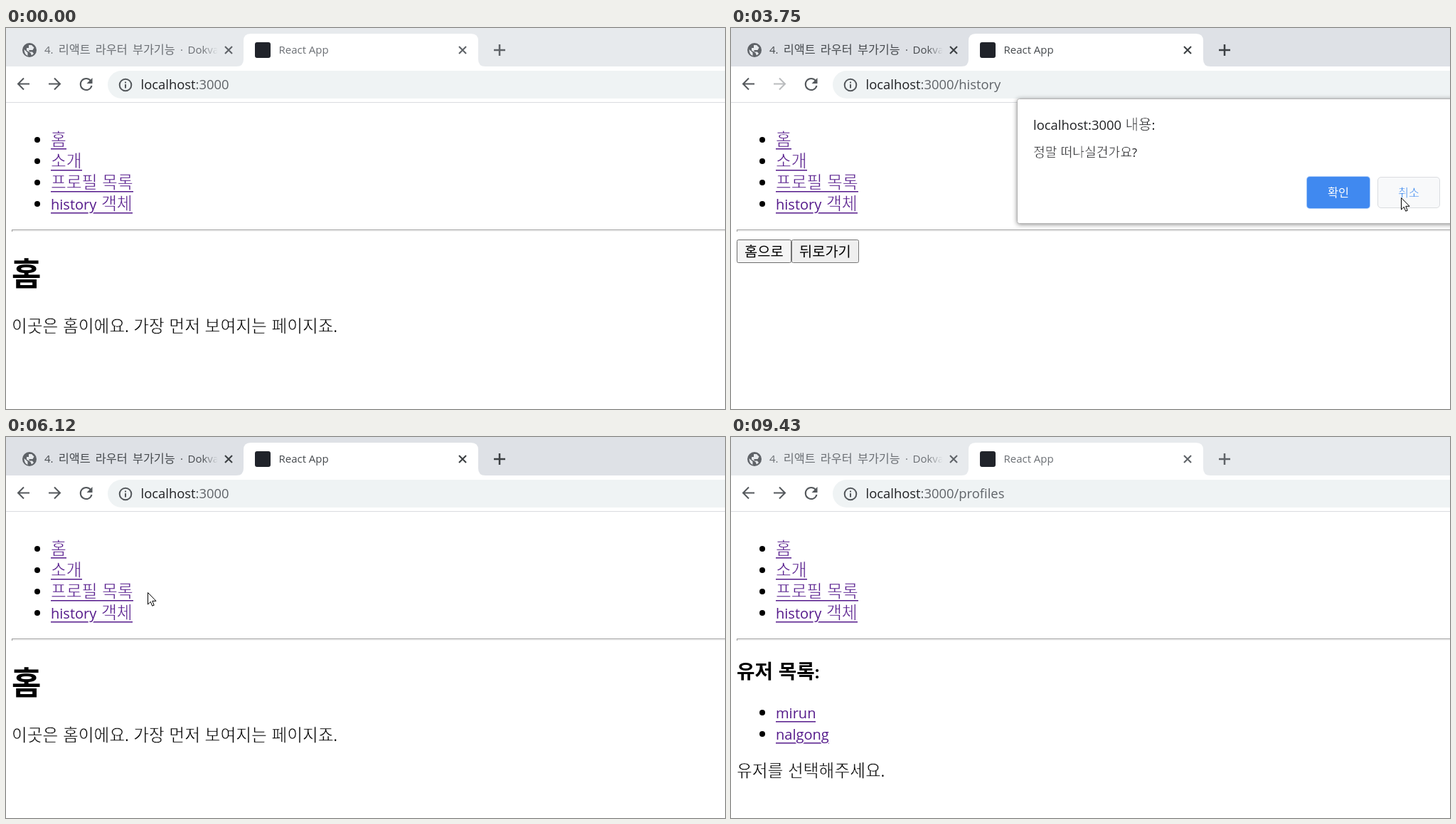
Write an HTML page that moves like this. It is 1011 by 535 pixels and loops after 9500 ms.

```html
<!DOCTYPE html>
<html lang="ko">
<head>
<meta charset="utf-8">
<title>React App</title>
<style>
html, body { margin: 0; width: 100%; height: 100%; overflow: hidden; background: #fff; }
svg { display: block; width: 100%; height: 100%; }
text { font-family: 'Noto Sans CJK KR', 'Noto Sans CJK JP', sans-serif; font-weight: 300; }
.latin { font-family: 'Open Sans', 'Noto Sans', sans-serif; font-weight: 400; }
.bold, .bold .latin { font-weight: 700; }
/* a hairline in the background colour slims the strokes */
.thin { stroke: #fff; stroke-width: .55; }
.thin .latin { stroke: none; }
.link { fill: #551a8b; }
.link .latin { stroke: #fff; stroke-width: 3.5; paint-order: stroke; }
.icon { fill: none; stroke: #54585c; stroke-width: 2; }
#strip { fill: #dee1e6; }
.tabText { fill: #45494d; }
.tabIcon { fill: none; stroke: #3c4043; stroke-width: 2.1; }
.idle #strip { fill: #e7eaed; }
.idle .tabText { fill: #6b6f74; }
.idle .tabIcon { stroke: #5f6368; }
#panel { fill: #fff; stroke: #b4b4b4; filter: drop-shadow(0 1px 3px rgba(0,0,0,.45)); }
</style>
</head>
<body>
<svg id="stage" viewBox="0 0 1011 535">
  <defs>
    <linearGradient id="fade" gradientUnits="userSpaceOnUse" x1="276" x2="298" y1="0" y2="0">
      <stop offset="0" stop-color="#fff"/><stop offset="1" stop-color="#fff" stop-opacity="0"/>
    </linearGradient>
    <mask id="cut" maskUnits="userSpaceOnUse" x="0" y="0" width="340" height="60">
      <rect width="297" height="60" fill="url(#fade)"/>
    </mask>
  </defs>
  <rect width="1011" height="535" fill="#fff"/>

  <rect id="strip" width="1011" height="54"/>
  <path d="M324 54q10 0 10-10V18q0-10 10-10H654q10 0 10 10V44q0 10 10 10z" fill="#fff"/>
  <circle cx="33" cy="31" r="10" fill="#5f6368"/>
  <path d="M25.5 30l5 4.5v4.5q-5-2-5-9zM32 24l4 0 3.5 3.5-2 3.5h-5l0 2.5h4.5l2 2.5-3 2.5-1.5-3.5-5.5-3.5v-3.5h3z" fill="#e7eaed"/>
  <rect x="350" y="20" width="22" height="22" rx="3" fill="#20232a"/>
  <g id="tabs"></g>
  <path class="tabIcon" d="M308 26l10 10m0-10l-10 10M637 26l10 10m0-10l-10 10"/>
  <path class="tabIcon" style="stroke-width:2.5" d="M686 31h16m-8-8v16"/>

  <rect y="104" width="1011" height="1" fill="#dadce0"/>
  <rect x="143" y="60" width="920" height="39" rx="19.5" fill="#eff3f4"/>
  <path class="icon" d="M33 78.5H17m8-8l-8 8 8 8"/>
  <path class="icon" id="forward" d="M60 78.5h16m-8-8l8 8-8 8"/>
  <path class="icon" d="M119 74a8 8 0 1 0 1.5 7"/>
  <path d="M121.5 70v8h-8z" fill="#54585c"/>
  <circle class="icon" cx="168" cy="80" r="8.3"/>
  <path class="icon" d="M168 79v5.5m0-9v2"/>
  <text class="latin" x="189.5" y="86" font-size="18.4" fill="#202124">localhost<tspan id="path" fill="#5f6368"></tspan></text>

  <g id="nav"></g>
  <path d="M8 283H1011v1H9v2H8z" fill="#9a9a9a"/>
  <rect x="9" y="285" width="1002" height="1" fill="#eee"/>

  <g id="home"></g>
  <g id="profiles"></g>
  <g id="history">
    <rect id="goHome" x="8.5" y="297.5" width="76" height="32" rx="2"/>
    <rect id="goBack" x="85.5" y="297.5" width="94" height="32" rx="2"/>
  </g>

  <g id="dialog">
    <rect id="panel" x="402.5" y="99.5" width="640" height="175" rx="3"/>
    <rect x="809" y="208" width="90" height="46" rx="5" fill="#a9cbf8"/>
    <rect id="ok" x="810" y="209" width="88" height="44" rx="4"/>
    <rect id="cancel" x="909.5" y="209.5" width="87" height="43" rx="4.5" stroke="#dadce0"/>
  </g>

  <g id="cursor">
    <path id="arrow" d="M.5 .5V17L4.3 13.3 6.7 19.2 9.2 18.2 6.8 12.3H12z" fill="#fff" stroke="#000"/>
    <path id="hand" d="M-1.6 13V1.6a1.6 1.6 0 0 1 3.2 0V8.5c0-1.5 3-1.5 3 .3c0-1.3 2.9-1.2 2.9.6c0-1.2 2.6-1 2.6.8V15.5c0 3-1.5 4-1.5 7H-.6c-.6-3-3.2-4.5-5.4-9c-1-2 1-2.8 2.2-1.6zM1.6 8.5v4m3-3.5v3.5m2.9-3v3" fill="#fff" stroke="#000"/>
    <circle id="press" r="15" fill="#ff0" fill-opacity=".52"/>
  </g>
</svg>

<script>
const $ = id => document.getElementById(id);
const LOOP = 9500, START = 280, TICK = 78.75, BODY = 23.7;

function add(parent, tag, attrs) {
  const el = document.createElementNS('http://www.w3.org/2000/svg', tag);
  for (const name in attrs) el.setAttribute(name, attrs[name]);
  return $(parent).appendChild(el);
}

// Latin runs get their own face, scaled against the Hangul size.
function write(parent, x, y, size, str, attrs = {}, ratio = .845) {
  const el = add(parent, 'text', { x, y, 'font-size': size, ...attrs });
  el.innerHTML = str.replace(/[!-~·]+(?: [!-~·]+)*/g,
    run => `<tspan class="latin" font-size="${size * ratio}">${run}</tspan>`);
  return el;
}

function link(parent, y, str) {
  add(parent, 'circle', { cx: 44, cy: y - 8, r: 4 });
  const line = add(parent, 'rect', { x: 63, y: y + 4, height: 1.5, class: 'link' });
  const el = write(parent, 63, y, BODY, str, { class: 'link thin' });
  line.setAttribute('width', Math.round(el.getComputedTextLength()));
}

write('tabs', 54, 36, 16.3, '4. 리액트 라우터 부가기능 · Dokvane',
  { class: 'tabText', mask: 'url(#cut)', style: 'word-spacing:2.6px' }, .92);
write('tabs', 383.5, 36, 16.3, 'React App', { class: 'tabText' }, .92);

['홈', '소개', '프로필 목록', 'history 객체'].forEach((s, i) => link('nav', 165 + 30 * i, s));

write('home', 8, 362, 45, '홈', { class: 'bold' });
write('home', 8, 427, BODY, '이곳은 홈이에요. 가장 먼저 보여지는 페이지죠.', { class: 'thin' });

write('profiles', 8, 339, 27.7, '유저 목록:', { class: 'bold' });
link('profiles', 395, 'mirun');
link('profiles', 425, 'nalgong');
write('profiles', 8, 477, BODY, '유저를 선택해주세요.', { class: 'thin' });

write('history', 19, 321, 19.8, '홈으로');
write('history', 96, 321, 19.8, '뒤로가기');

write('dialog', 425, 143, 20, 'localhost:3000 내용:', { fill: '#202124', class: 'thin' }, .92);
write('dialog', 425, 181, 18.2, '정말 떠나실건가요?', { fill: '#202124', class: 'thin' }, .9);
write('dialog', 839, 237, 16.3, '확인', { fill: '#fff' });
write('dialog', 938, 237, 16.3, '취소', { fill: '#1a73e8', class: 'thin' });

// tick, page, path, dialog opened by, forward enabled
const states = [
  [-9, 'home', '', '', 1],
  [10, 'history', '/history', '', 0],
  [21, 'history', '/history', 'goHome', 0],
  [48, 'history', '/history', '', 0],
  [57, 'history', '', 'goBack', 1],
  [66, 'home', '', '', 1],
  [78, 'profiles', '/profiles', '', 0],
  [86, 'history', '/history', '', 0],
  [91, 'history', '/profiles', 'goBack', 1],
  [102, 'profiles', '/profiles', '', 1]
];
const clicks = [9, 20, 47, 56, 65, 77, 85, 90, 101];

// from tick, to tick, x, y, sag
const moves = [
  [-1, 6, 108, 251, 0],
  [13, 18, 44, 313, 0],
  [22, 33, 855, 235, 270],
  [39, 44, 942, 238, 8],
  [48, 55, 138, 312, 0],
  [57, 64, 851, 232, 0],
  [67, 76, 105, 216, 0],
  [78, 83, 127, 247, 0],
  [87, 89, 140, 300, 0],
  [91, 96, 925, 275, 0],
  [96, 100, 862, 240, 0],
  [102, 108, 1030, 82, 0]
];

function pointer(k) {
  let x = 498, y = 545;
  for (const [from, to, tx, ty, sag] of moves) {
    if (k <= from) break;
    const u = Math.min(1, (k - from) / (to - from));
    const e = u * u * (3 - 2 * u);
    x += (tx - x) * e;
    y += (ty - y) * e + 2 * sag * e * (1 - e);
  }
  return [x, y];
}

const show = (id, on) => $(id).setAttribute('visibility', on ? 'inherit' : 'hidden');
const inside = (x, y, l, t, r, b) => x >= l && x < r && y >= t && y < b;

const looks = {
  normal: ['#efefef', '#767676'],
  hover: ['#e5e5e5', '#4f4f4f'],
  active: ['#f5f5f5', '#6d6d6d']
};
function paint(id, look) {
  const [fill, stroke] = looks[look];
  $(id).setAttribute('fill', fill);
  $(id).setAttribute('stroke', stroke);
}

function draw(k) {
  const [, page, path, opener, forward] = states.filter(s => s[0] <= k).pop();
  const [x, y] = pointer(k);
  const pressed = clicks.includes(k);

  $('stage').classList.toggle('idle', k < 9 || k >= 116);
  $('path').textContent = ':3000' + path;
  $('forward').style.stroke = forward ? '' : '#babcbe';
  for (const id of ['home', 'profiles', 'history']) show(id, id === page);
  show('dialog', opener);

  const button = (id, l, r) => {
    let look = 'normal';
    if (opener) {
      if (opener === id) look = id === 'goHome' ? 'active' : 'hover';
    } else if (inside(x, y, l, 297, r, 330)) look = pressed ? 'active' : 'hover';
    paint(id, look);
  };
  button('goHome', 8, 85);
  button('goBack', 85, 180);
  $('ok').setAttribute('fill', inside(x, y, 810, 209, 898, 253) ? '#4a8eee' : '#4089f0');
  $('cancel').setAttribute('fill', inside(x, y, 909, 209, 997, 253) ? '#f8f9fa' : '#fff');

  const overLink = !opener && inside(x, y, 63, 146, 179, 262);
  $('cursor').setAttribute('transform', `translate(${Math.round(x)} ${Math.round(y)})`);
  show('arrow', !overLink);
  show('hand', overLink);
  show('press', pressed);
}

let last = null;
function frame(now) {
  const k = Math.floor((now % LOOP - START) / TICK);
  if (k !== last) draw(last = k);
  requestAnimationFrame(frame);
}
frame(performance.now());
</script>
</body>
</html>
```
